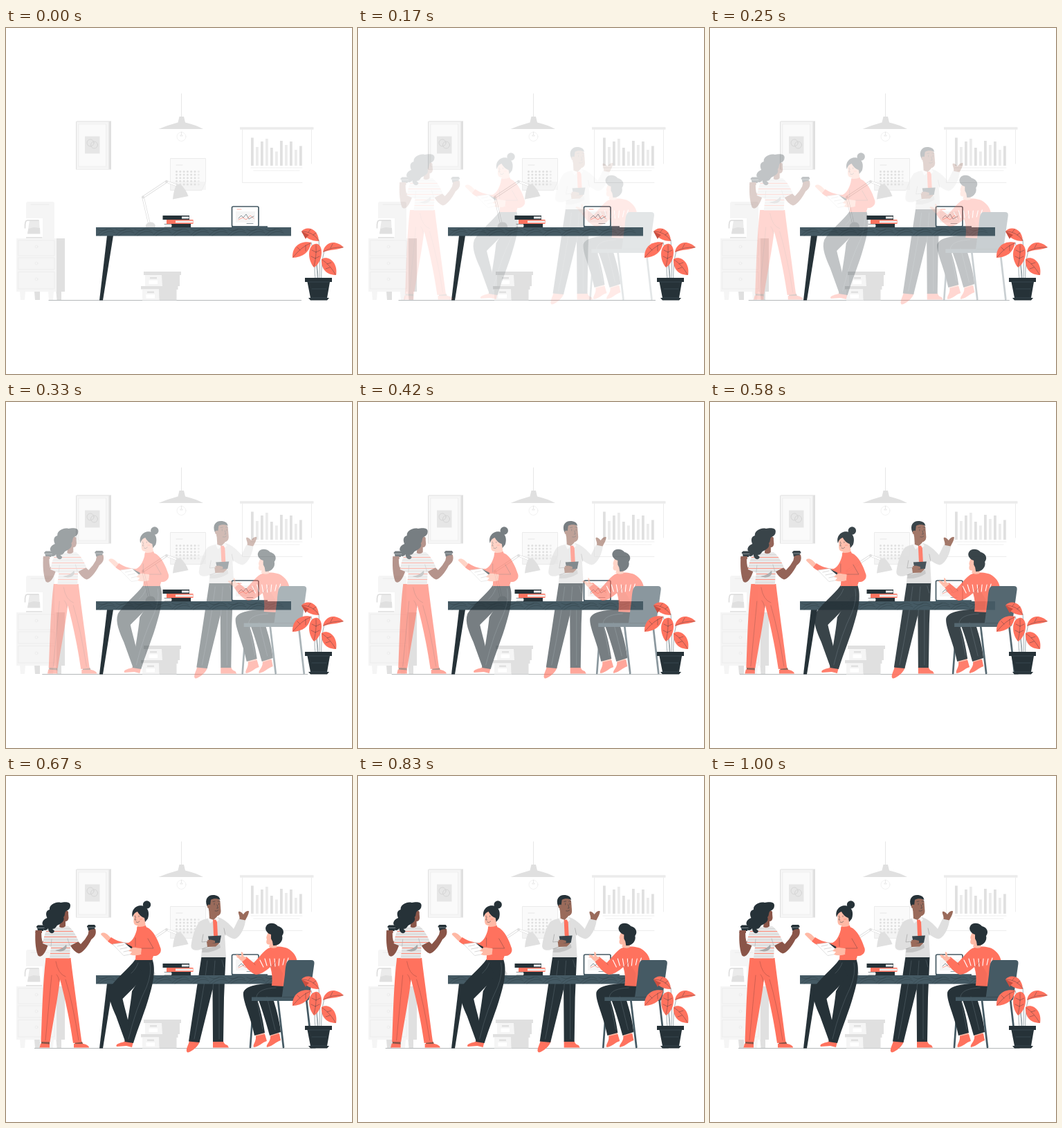
These frames come from a looping animation (500x500 px, 1.04 s). An HTML page:

```html
<!DOCTYPE html>
<html lang="en">
<head>
<meta charset="utf-8">
<title>Office team</title>
<style>
html, body { margin: 0; width: 100%; height: 100%; overflow: hidden; background: #fff; }
svg { display: block; width: 100%; height: 100%; }
.line { fill: none; stroke-linecap: round; stroke-linejoin: round; }
.coral { fill: #ff725e; } .dark { fill: #263238; } .slate { fill: #455a64; }
.brown { fill: #8a5548; } .tan { fill: #9a6b5b; } .skin { fill: #ffb9a5; } .shirt { fill: #dfdfdf; }
.l1 { fill: #f5f5f5; } .l2 { fill: #ebebeb; } .l3 { fill: #e0e0e0; }
.seam { stroke: #6b7980; stroke-width: .4; }
.ink { stroke: #263238; stroke-width: .5; }
</style>
</head>
<body>
<svg viewBox="0 0 500 500">
<defs>
  <pattern id="stripes" width="10" height="8" y="221" patternUnits="userSpaceOnUse">
    <path fill="#e6e6e6" d="M0 0H10V8H0z"/>
    <path fill="#ff8a78" d="M0 3H10V4H0z"/>
    <path fill="#cfcfcf" d="M0 7H10V7.7H0z"/>
  </pattern>
</defs>

<path id="floor" stroke="#263238" stroke-width=".35"/>

<g id="picture">
  <path class="l3" d="M101 136Q101 134.500 103 134.500H152V204.500H101z"/>
  <path class="l1" d="M102 135.500H148.500V204H102z"/>
  <path d="M105 139H144.500V200H105z" fill="#fafafa" stroke="#ebebeb" stroke-width=".7"/>
  <path fill="#e6e6e6" d="M114 156.500H135.500V181.500H114z"/>
  <g class="line" stroke="#d6d6d6"><circle cx="122" cy="166" r="5"/><circle cx="127.500" cy="169" r="5"/></g>
</g>

<g id="pendant">
  <path class="line" stroke="#e0e0e0" stroke-width=".8" d="M253.500 95V129"/>
  <circle class="line" cx="253.500" cy="157" r="6.500" stroke="#ebebeb" stroke-width=".7"/>
  <path class="line" stroke="#dcdcdc" stroke-width=".6" d="M253.500 150V154L251.500 156H255.500L253.500 154"/>
  <path class="l3" d="M250.500 128H257L259 136.500Q274 140 285 146H220.500Q235 140 248.500 136.500z"/>
</g>

<g id="board">
  <path class="line" stroke="#e6e6e6" stroke-width=".7" d="M428 223.500H341.500V147M441.500 147V196"/>
  <path class="l2" d="M338 143.200H444.500V146.700H338z"/>
  <path class="line" stroke="#ebebeb" stroke-width=".8" d="M354 202H428M358 206H424" stroke-dasharray="11 1"/>
</g>

<g id="calendar">
  <path d="M237.500 188.500H288.500V222L283 234.500H237.500z" fill="#fafafa" stroke="#e8e8e8" stroke-width=".8"/>
  <path fill="#f0f0f0" d="M237.500 222H289V234H237.500z" opacity=".5"/>
  <path class="line" stroke="#e6e6e6" d="M246 198H255"/>
</g>

<g id="deskLamp">
  <path class="line" stroke="#dcdcdc" stroke-width="3.400" d="M207 283L198 244.500 232 222 248 228"/>
  <path class="line" stroke="#fff" stroke-width="2" d="M207 283L198 244.500 232 222 248 228"/>
  <g class="l3"><circle cx="198" cy="244.500" r="2"/><circle cx="232" cy="222" r="2"/>
  <path d="M246.500 226L252 225.500Q260 233 263.500 243L241 247.500Q242 235 246.500 226zM201.500 288Q202 280.500 209 280.500T216 288z"/></g>
</g>

<g id="coffee">
  <path class="l1" d="M29 254Q29 251 32 251H67Q70 251 70 254V304H29z"/>
  <path class="line" stroke="#ebebeb" d="M36 255H62"/>
  <path fill="#fff" d="M29 275H53V302H29z"/>
  <path class="l2" d="M34 278H48L49 297H31z"/>
  <path class="l3" d="M32.500 290L40 288 49 289 49.500 297.500H31zM29 302H52V303.500H29z"/>
  <path class="line" stroke="#dcdcdc" stroke-width="1.600" d="M47 278H31Q27 278 27.500 289"/>
</g>
<g id="cabinet">
  <path class="l1" d="M15 304H73V381H15zM20 381H28L27 393H21zM61 381H69L68 393H62z"/>
  <path class="l3" d="M73 304H85V381H73zM41 381H49V393H42zM72.500 381H80V393H73.500z"/>
  <g class="line" stroke="#ebebeb" stroke-width=".8">
    <path d="M18 307H70V329H18zM18 332H70V349H18zM18 352.500H70V377H18z"/>
    <circle cx="44" cy="316" r="2"/><circle cx="44" cy="340" r="2"/><circle cx="44" cy="363" r="2"/>
  </g>
</g>

<g id="boxes">
  <path class="l1" d="M201 357H226V373H201zM197 378H222V393.500H197z"/>
  <path class="l3" d="M199 352H253V357H251V373H248.500V378H246.500V393.500H221.500L221 377.500H195V373H226L225 357H199z"/>
  <path class="l3" d="M208 360H218V362.500H208zM204 380.500H214V383H204z"/>
  <path fill="#fff" d="M206.500 364.500H219V370H206.500zM202.500 385H215V390.500H202.500z"/>
</g>

<g id="tallMan">
  <path class="coral" d="M265 383H280C279 390 269 398 263 399.500 258 398 263 390 265 383zM299 383H314Q315 388 320 389L322 392.500H299z"/>
  <path class="dark" d="M282.500 261H317.500L315 320 314 384H299L298.500 308 279.500 385 264 383.500z"/>
  <path class="line seam" d="M291 267Q286 310 272 380M302 267L299 308M308 290V380M312 266L315 276"/>
  <path class="tan" d="M337 208C339 203 335 199 336 196 339 195 341 198 343 200 345 196 350 194 351 195.500 351 200 347 206 345 210z"/>
  <path class="shirt" d="M291 206L306 204C315 206 323 214 329 221L336 206.500 346 208.500C345 220 338 234 330 235.500Q323 234 316 228L318 262H282L283 250C273 254 267 251 267.500 245 269 232 274 217 280 210Q285 207 291 206z"/>
  <path fill="#c4c4c4" d="M284 249Q298 249 309 243L310 248Q298 256 283 255z"/>
  <path class="line" stroke="#999" stroke-width=".6" d="M285 229L283 240 292 239M283 250L294 246M315 220L317 230"/>
  <path class="tan" d="M293 190H305V205Q301 211 294 206z"/>
  <path fill="#f5f5f5" d="M291 205L300 208 305 203 308 208 303 212 300 209 295 213z"/>
  <path class="coral" d="M299 208L303 207.500 305 211 306 231 302.500 236 300 230z"/>
  <path class="tan" d="M290 239L306 238 308 242 303 246.500 291 247z"/>
  <path fill="#37444b" d="M292 231.500L311 230.500 309 241 294 242z"/>
  <path class="tan" d="M291 237L296 236.500 302 238 302 241 293 243z"/>
  <path class="tan" d="M291.500 182C293 174 308 173 309.500 182L310.500 195C310.500 202 304 204 300 201L293 194z"/>
  <path class="dark" d="M290.500 188C286.500 178 292 172 299 172 305 172 308.500 174 309.500 179 305 176.500 299 177 296 179L295 187 293 189z"/>
  <circle class="tan" cx="293.500" cy="188.500" r="2.700"/>
  <path class="line ink" d="M301 184V186M307.500 184V186M299 181.500L302 181M306 181H309M305 186L306.500 191H304.500M302 195Q305 196 307 194"/>
</g>

<g id="table">
  <path class="dark" d="M146 300H155L140 393.500H135z"/>
  <path class="slate" d="M130 288H412V300.500H130z"/>
</g>

<g id="laptop">
  <rect x="326.500" y="258" width="38.500" height="29" rx="2" fill="#fff" stroke="#455a64" stroke-width="1.700"/>
  <path fill="#f5f5f5" d="M332 265H360V281H332z"/>
  <path class="line" stroke="#ff725e" stroke-width=".6" d="M334 262H340M336 277L342 274 347 277 353 271 358 275"/>
  <path class="line" stroke="#455a64" stroke-width=".6" d="M336 275L340 271 343 274 347 269 351 276 358 272M348 282.500H357"/>
  <path class="slate" d="M326 286.300H378V288.300H326z"/>
</g>

<g id="books">
  <path class="dark" d="M226.500 271H265V277H226.500zM239 283H267V288H239z"/>
  <path class="coral" d="M232 277H270.500V283H232z"/>
  <path fill="#f0f0f0" d="M254 272.500H264.500V275.500H254zM245 278.500H270V281.500H245zM229 284.500H239.500V287H229z"/>
  <path class="line ink" d="M229 283.500H267M229 288H267"/>
</g>

<g id="women">
  <g id="coffeeWoman">
    <path class="brown" d="M53 238L61 243C58 254 51 265 46 259 42 248 42 234 42.500 225L51 224Q51 233 52.500 240zM93 245L104 239 108 243Q115 236 118.500 229L120 222 129 220.500C131.500 228 128 233 123.500 236 118 247 110 256 105 256.500Q98 254 93 245z"/>
    <path class="brown" d="M51 383H63V388H51zM99 384H110L112 389H100z"/>
    <path class="coral" d="M50 386.500L63 387.500V392.500H48.500zM98 387H112Q120 389 120 392.500H98z"/>
    <path class="coral" d="M57.500 263H93.500C96 285 103 335 109.500 384.500L97 386C92 350 83 312 78 294 75 320 69 350 63.500 384.500L50.500 384C52 345 53 300 57.500 263z"/>
    <path class="line" stroke="#a34c42" stroke-width=".5" d="M72 268Q75 286 86 290M66 288Q62 330 57 382M86 294Q97 330 105 382M77 297Q76 290 73 287"/>
    <path fill="url(#stripes)" d="M62 219L90 217C97 222 102 232 105 239L93 245 92 263.500H63L65 247 53 242C55 232 57 222 62 219z"/>
    <path class="line" stroke="#aaa" stroke-width=".6" d="M65 246L66 236M92 245L89 235"/>
    <path fill="#a9a9a9" d="M71 252Q83 250 87 243.500C90 251 81 256 71 252z"/>
    <path class="brown" d="M80 195C87 192 91 195 90 199L90.500 205Q90 210 86 210L86 217Q82 221 77 218z"/>
    <path class="dark" d="M93 187C93 181 84 182 79 183 71 181 62 187 63 193 56 195 58 202 59.500 205 52 208 50 215 56 217 51 222 57 226 61 220 61 227 68 230 70 224L67 221C73 221 72 216 76 215 82 212 85 208 83 204 86 202 84 197 87 195Q93 193 93 187z"/>
    <g id="cup"><path class="dark" d="M44 217.500L46 215.500H55L56.500 217.500V219H55.500L54 224H46L45 219H44z"/><path fill="#78858b" d="M45.500 219H55.500V220H45.500z"/></g>
    <use href="#cup" x="73" y="-.5"/>
    <path class="brown" d="M42.500 223H52V227H42.500zM120 223Q125 220 129 222L127 230 119 230z"/>
  </g>

  <g id="noteWoman">
    <path class="skin" d="M172 380H183V387H170zM152 234C148 231 147 228 142 226.500 138 226 136 228 138 230L143 235Q146 239 150 240z"/>
    <path class="coral" d="M171 384H184L182 392 174 390 160 391C157 387 168 385 171 384z"/>
    <path class="dark" d="M187 265H211.500C217 280 212 302 207 318 201 340 191 363 184 386L171.500 384C174 362 180 332 182 311L196 288z"/>
    <path class="dark" d="M187 265C178 278 158 293 150.500 306 146 318 153 333 159 347L172 383 181 378C177 352 171 334 168.500 322 178 312 190 302 199 288z"/>
    <path class="line seam" d="M208 270Q211 285 203 305 188 335 177 380M191 270Q188 279 181 285"/>
    <path class="coral" d="M190 217.500Q197 215 203 218.500C213 222 220 238 223.500 249 225 255 221 260 213 260L211 266H187L188 250C177 252 158 248 147 239L152 233C160 239 171 241 177 241 184 238 188 228 190 217.500z"/>
    <path fill="#fff" stroke="#c8c8c8" stroke-width=".6" d="M154 243L172 240.500 189 256 170 259.500z"/>
    <path class="dark" d="M171 241L182 246.500 184 252z"/>
    <path class="line" stroke="#bbb" stroke-width=".6" d="M161 246L170 244M165 250L175 248M170 254L179 252"/>
    <path class="skin" d="M198 249C191 250 186 246 181 249L177 253 182 254 179 258Q187 261 198 257z"/>
    <path class="coral" d="M207 239L214 251 196 248.500 195 257.500Q206 262 219 259z"/>
    <path class="line ink" d="M205 235L213 249 196 249M187 234V246" opacity=".65"/>
    <path class="skin" d="M184 196C186 190 199 190 202 199L201 211 202 218Q196 220 190 218L190 216C185 216 184 212 184.500 207z"/>
    <path class="coral" d="M189.500 217.500Q196 219 202 216L204 222H189z"/>
    <circle class="dark" cx="203.500" cy="186" r="5.700"/>
    <path class="dark" d="M183 204C180 194 188 186 197 187.500 205 189 208 197 205 206L201 211 200 205C196 204 192 200 190 196Q185 197 183 204z"/>
    <path class="line ink" d="M186.500 202V203.500M192 202V203.500M187.500 204L186 208H188M188 211Q191 213 193 210"/>
    <path fill="#ff8f7d" d="M193 206H197V208H193z" opacity=".5"/>
  </g>
</g>

<g id="seated">
  <path class="line" stroke="#455a64" stroke-width="2.700" d="M358 324L353 392M393 324L401 392M434 322L442 392"/>
  <path class="skin" d="M360 371L373 369 375 379 362 380zM381 371L394 369 394 378 383 379z"/>
  <path class="coral" d="M361 376L374 373 377 383C370 385 366 391 358 392 356 388 362 384 361 376zM382 376L395 372 397 382C390 384 386 390 377 392 375 388 383 384 382 376z"/>
  <path class="dark" d="M402 300C375 299 346 301 343 313 342 326 353 345 359 375L374 371C371 350 367 336 364 326L365 324C371 340 377 360 381 375L397 370C395 350 389 332 386 322L404 320z"/>
  <path class="line seam" d="M390 306Q364 307 362 319 366 342 371 366M377 319Q383 342 389 367"/>
  <path class="coral" d="M379 249C388 245 404 246 410 251 417 256 420 262 421 269L404 304 384 303Q386 290 382 276C374 283 367 287 361 287 353 284 346 276 341 268L347 261 358 270C364 264 371 254 379 249z"/>
  <path fill="#d95d4d" d="M383 276L391 270 400 285 399 304 385 303Q387 290 383 276z" opacity=".25"/>
  <path class="line" stroke="#fff" stroke-width="1.100" d="M367 266L372 276M374 264L377 274M381 264L383 275M388 264L389 275M395 264L394 274M402 264L400 273M408 263L406 270"/>
  <path class="line" stroke="#a34c42" stroke-width=".5" d="M382 276Q390 271 391 265M358 270L360 273"/>
  <path class="skin" d="M342 268C337 266 336 262 332 259.500 333 257 337 259 340 261L340 254Q343 254 343 260L348 263z"/>
  <path class="skin" d="M379 225L386 227 393 238 391 248Q385 250 380 247L381 243.500C377 244 375 241 377 236 375 233 378 229 379 225z"/>
  <path class="dark" d="M376 217C379 211 389 212 393 217 401 219 403 226 399 231 401 238 395 246 386 245L385 239 383 235 383 229C378 228 373 222 376 217z"/>
  <path class="slate" d="M410 266H441Q446 266 445.500 271L438.500 321Q438 325 433 325H398L403 287C404 274 405 266 410 266zM355 319.500H435V325H355z"/>
  <path class="line" stroke="#37474f" stroke-width=".8" d="M400 319.500H434"/>
</g>

<g id="plant">
  <path class="line" stroke="#455a64" stroke-width=".5" d="M447 362Q445 348 447 336M450 362Q450 340 441 310M453 362Q455 335 452 306M455.500 362Q456 335 460 322M451 362Q450 340 448 330"/>
  <path class="dark" d="M432 361H471V367H468L464 390H467L464 393.500H440L437 390H440L435.500 367H432z"/>
  <path class="line" stroke="#455a64" stroke-width=".5" d="M437 367H467M442 377H463M440 390H464"/>
  <g class="coral">
    <path d="M427 294C433 286 451 288 452 308Q435 308 427 294z"/>
    <path d="M441 310C429 307 413 313 414 332 429 331 438 325 441 310z"/>
    <path d="M447 312C436 314 435 334 445 346 456 340 459 321 453 314Q450 311 447 312z"/>
    <path d="M458 324C460 311 474 304 488 317 478 321 468 320 458 324z"/>
    <path d="M456 334C466 328 480 339 477 357 463 357 455 348 456 334z"/>
  </g>
  <path fill="#c94f40" d="M427 294L438 299Q434 302 433 305z"/>
  <path class="line ink" opacity=".75" d="M428 294Q443 294 452 307M437 295L440 291M444 299L448 296M440 311Q427 316 415 331M433 314L433 322M425 321L421 317M448 314Q449 330 445 344M448 324L442 321M448 324L454 321M447 333L441 330M447 333L453 330M459 323Q471 316 487 317M469 318L472 312M457 335Q468 342 476 356M464 341L470 339M468 346L462 348"/>
</g>
</svg>

<script>
const $ = id => document.getElementById(id);
const add = (id, markup) => $(id).insertAdjacentHTML('beforeend', markup);

const barTops = [158.5, 172, 164, 160, 173, 178.5, 163, 169, 164, 176, 170.5];
add('board', barTops.map((top, i) =>
  `<path class="${i % 2 ? 'l2' : 'l3'}" d="M${354 + 7 * i} 199V${top}h3.800V199z"/>`).join(''));

for (let row = 0; row < 5; row++)
  for (let col = 0; col < 7; col++)
    add('calendar', `<circle class="${col < 6 ? 'l3' : 'l2'}" cx="${246.5 + 5.3 * col}" cy="${207.5 + 4.6 * row}" r="1.500"/>`);

// Wood grain: staggered arcs along the table top
let grain = '';
for (let x = 132; x < 390; x += 27)
  grain += `M${x} 299Q${x + 14} 285 ${x + 24} 293M${x + 4} 300Q${x + 16} 290 ${x + 26} 296M${x} 291q8 4 14 0`;
add('table', `<path class="line" stroke="#263238" stroke-width=".5" opacity=".6" d="${grain}"/>`);

// cubic-bezier(.36, -.01, .5, 1.38)
const curve = (a, b, s) => 3 * (1 - s) ** 2 * s * a + 3 * (1 - s) * s * s * b + s ** 3;
function ease(x) {
  let low = 0, high = 1;
  for (let i = 0; i < 24; i++) {
    const mid = (low + high) / 2;
    if (curve(.36, .5, mid) < x) low = mid; else high = mid;
  }
  return curve(-.01, 1.38, low);
}

const LOOP = 1040, STEPS = 25, SLIDE = 20.5;
const entrances = [['women', 1], ['tallMan', 1], ['seated', -1]];

function draw() {
  const step = Math.floor(((performance.now() % LOOP) + 4) / LOOP * STEPS) % STEPS;
  const p = step < 2 ? 0 : ease((step + 1) / STEPS);
  const shift = SLIDE * (1 - p);
  for (const [id, dir] of entrances) {
    $(id).setAttribute('transform', `translate(${dir * shift})`);
    $(id).setAttribute('opacity', Math.min(p, 1));
  }
  $('floor').setAttribute('d', `M${41 + shift} 393.500H${447.5 - shift}`);
  requestAnimationFrame(draw);
}
draw();
</script>
</body>
</html>
```
